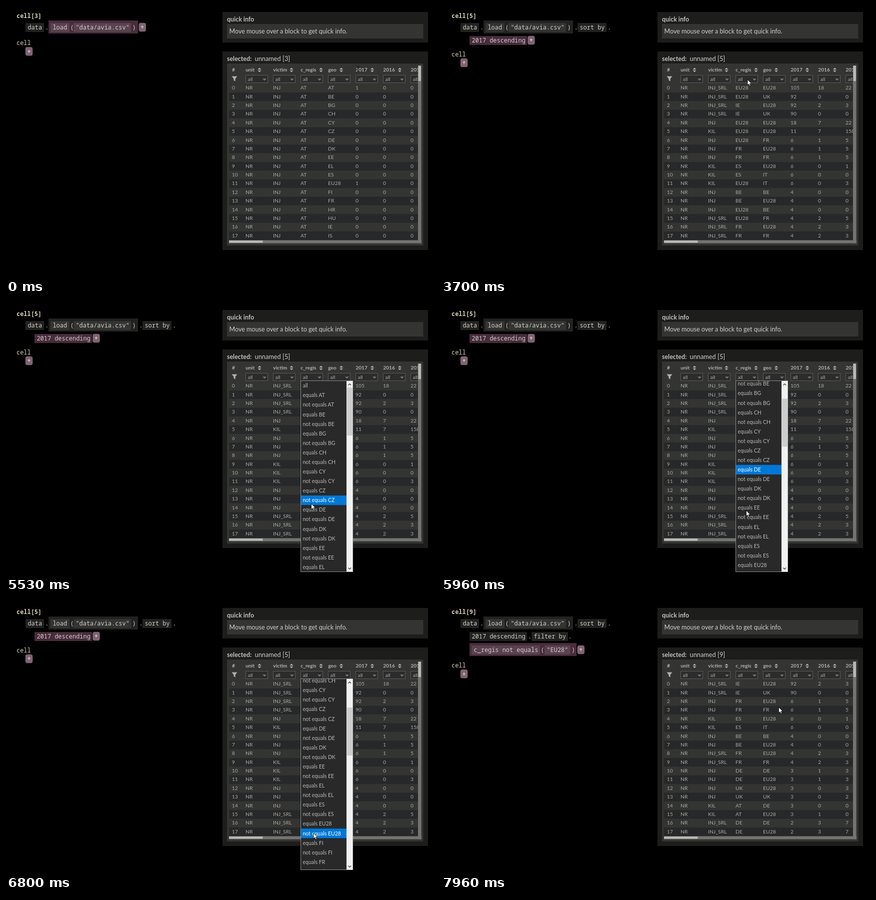
Animation of 858 by 540 pixels, one loop 8000 ms. Source, as an HTML page:

```html
<!DOCTYPE html>
<html lang="en">
<head>
<meta charset="utf-8">
<title>Data table notebook</title>
<style>
  html, body { margin: 0; width: 100%; height: 100%; overflow: hidden; background: #000001; }
  svg { display: block; width: 858px; height: 540px; }
  text { font-family: Lato, "Open Sans", sans-serif; font-size: 10.4px; fill: #a9a9a4; white-space: pre; }
  .head { font-size: 10.2px; font-weight: 700; fill: #b2b2ad; }
  .big { font-size: 12.8px; fill: #d0d0cb; }
  .info { font-size: 12.55px; }
  .title { font-size: 12.4px; font-weight: 700; fill: #c3c3be; }
  .mono { font-family: "Noto Sans Mono", "DejaVu Sans Mono", monospace; font-size: 11.95px; fill: #d2d0c8; }
  .cell { fill: #d6d0b8; }
  .bold { font-weight: 700; }
  .opt { font-size: 10.5px; fill: #b9b9b6; }
  .opt.on { fill: #fff; }
</style>
</head>
<body>
<svg viewBox="0 0 858 540" xmlns="http://www.w3.org/2000/svg">
  <defs>
    <clipPath id="tableClip"><rect x="446" y="116" width="378" height="353"/></clipPath>
    <clipPath id="listClip"><rect x="590" y="154" width="91" height="381"/></clipPath>
    <g id="arrow">
      <path d="M0 0V11.3L2.6 8.9 4.4 13 6.3 12.2 4.5 8.2H8.1Z" fill="#fff" stroke="#000" stroke-width=".8"/>
    </g>
    <g id="hand">
      <path d="M-1.2 8.2V.5Q-1.2-.7 0-.7T1.2.5V4.6L4.9 5.2Q6.6 5.6 6.5 7.2L6 10.2 5.2 12.8H-.2L-1.4 10.6-3.4 7.6Q-3.4 6-1.2 8.2Z"
        fill="#fff" stroke="#000" stroke-width=".8"/>
    </g>
    <g id="beam">
      <path d="M-2.5-5.2H-.8L0-4.6 .8-5.2H2.5M0-4.6V4.6M-2.5 5.2H-.8L0 4.6 .8 5.2H2.5" fill="none" stroke="#050505" stroke-width=".8"/>
    </g>
  </defs>
  <g id="first"></g>
  <g id="sorted"></g>
  <g id="menu"></g>
  <use id="cursor" href="#beam"/>
  <g id="filtered"></g>
</svg>
<script>
const LOOP = 8000;
const ROW = 17.38, OPTION = 19.08, LIST_TOP = 154, SCROLL = 158.7;
const DARK = '#222321', MID = '#343533', STRIPE = '#272829';
const PICK = '#482c3b', PICK_IN = '#5a4250', PLUS = '#7f6373';

const $ = id => document.getElementById(id);
const rect = (x, y, w, h, fill, more = '') =>
  `<rect x="${x}" y="${y}" width="${w}" height="${h}" fill="${fill}" ${more}/>`;
const text = (x, y, s, cls = '') => `<text x="${x}" y="${y}" class="${cls}">${s}</text>`;
const path = (d, fill) => `<path d="${d}" fill="${fill}"/>`;
const mono = (x, y, s, cls = '') => text(x, y, s, 'mono ' + cls);

// Data

const places = 'AT BE BG CH CY CZ DE DK EE EL ES EU28 FI FR HR HU IE IS'.split(' ');
const columns = [['unit', 507], ['victim', 571], ['c_regis', 630], ['geo', 670.5],
  ['2017', 732.5], ['2016', 787.5], ['2015', 842]];

const plainRows = places.map(p => {
  const hit = p === 'AT' || p === 'EU28' ? 1 : 0;
  return ['INJ', 'AT', p, hit, 0, 0];
});

const ranked = `INJ_SRL EU28 EU28 105 18 22
INJ_SRL EU28 UK 92 0 0
INJ_SRL IE EU28 92 2 3
INJ_SRL IE UK 90 0 0
INJ EU28 EU28 18 7 22
KIL EU28 EU28 11 7 158
INJ EU28 FR 6 1 5
INJ FR EU28 6 1 5
INJ FR FR 6 1 5
KIL ES EU28 6 0 1
KIL ES IT 6 0 0
KIL EU28 IT 6 0 3
INJ BE BE 4 0 0
INJ BE EU28 4 0 0
INJ EU28 BE 4 0 0
INJ_SRL EU28 FR 4 2 5
INJ_SRL FR EU28 4 2 3
INJ_SRL FR FR 4 2 3
INJ DE DE 3 1 3
INJ DE EU28 3 1 3
INJ UK EU28 3 0 3
INJ UK UK 3 0 2
KIL AT DE 3 0 0
KIL AT EU28 3 1 0
INJ_SRL DE DE 2 3 7
INJ_SRL DE EU28 2 3 7`.split('\n').map(line => line.split(' '));
const filteredRows = ranked.filter(r => r[1] !== 'EU28');

// Right side: info panel and table

function table(rows) {
  let s = '';
  for (let i = 0; i < 18; i++) {
    const y = 155.4 + i * ROW, base = (y + 11.9).toFixed(2);
    if (i % 2) s += rect(446, y.toFixed(2), 378, ROW, STRIPE);
    s += text(451.7, base, i);
    ['NR', ...rows[i]].forEach((v, c) => { s += text(479 + 55 * c, base, v); });
  }
  s += text(452, 131.2, '#', 'head');
  s += path('M451.5 140.5H462.5L458.6 145.5V150.5L455.4 148.5V145.5Z', '#b2b2ad');
  columns.forEach(([name, mark], c) => {
    const x = 479 + 55 * c;
    s += text(x + .3, 131.2, name, 'head');
    s += path(`M${mark - 3.6} 127h7.2l-3.6-3.6zm0 1.7h7.2l-3.6 3.6z`, '#b2b2ad');
    s += rect(x + .5, 138.5, 44, 15, '#2b2c2b', 'stroke="#5a5b59"');
    s += text(x + 4.5, 149.8, 'all');
    s += path(`M${x + 34} 145.3h8l-4 4z`, '#777874');
  });
  return `<g clip-path="url(#tableClip)">${s}</g>`;
}

function panels(number, rows) {
  return rect(433, 12, 411, 61, '#1d1e1c') + rect(442, 36, 392.5, 29, MID) +
    text(442, 31, 'quick info', 'title') +
    text(446.5, 55, 'Move mouse over a block to get quick info.', 'big info') +
    rect(433, 91, 411, 397, '#1d1e1c') + rect(442, 115, 392.5, 364, MID) +
    text(442, 110, 'selected:', 'title') +
    text(497.5, 110, `unnamed [${number}]`, 'big') +
    table(rows) +
    rect(446, 468.5, 385, 6, '#747472') + rect(446, 469, 67.5, 4.5, '#b9b9b7') +
    rect(824, 119, 6.5, 355.5, '#747472') + rect(824.5, 119.5, 5.5, 30.5, '#b9b9b7');
}

// Left side: code blocks

const block = (x, y, w, s, fill = DARK, pad = 4.4) => rect(x, y, w, 18, fill) + mono(x + pad, y + 12.8, s);
const plus = (x, y) => rect(x, y, 14.5, 17.5, PLUS, 'rx="4"') + mono(x + 3.6, y + 12.5, '+', 'bold');
const dot = (x, y) => mono(x, y, '.');
const nextCell = y => mono(21, y, 'cell', 'cell') + plus(38.8, y + 4);

function call(x, y, w, name, nameW, arg, argX, argW, picked) {
  const inner = picked ? PICK_IN : MID;
  return rect(x, y, w, 26, picked ? PICK : DARK) +
    block(x + 4, y + 5, nameW, name, inner) + mono(x + 4 + nameW + 1.6, y + 17.8, '(') +
    block(argX, y + 5, argW, arg, inner) + mono(argX + argW + 2.5, y + 17.8, ')');
}

const load = picked => block(39, 34, 37, 'data') + dot(78.3, 46.8) +
  call(85, 29, 179, 'load', 38, '"data/avia.csv"', 135, 115, picked);
const sortBy = load(false) + dot(266.5, 46.8) + block(273, 34, 58, 'sort by') + dot(333, 46.8);

const code = {
  3: load(true) + plus(265.5, 33.8) + nextCell(78),
  5: sortBy + block(57, 60, 115, '2017 descending', PICK) + plus(173.2, 59.8) + nextCell(100.8),
  9: sortBy + block(57, 60, 115, '2017 descending') + dot(174, 72.8) +
    block(181, 60, 73, 'filter by') + dot(254.5, 72.8) +
    call(57, 82, 214, 'c_regis not equals', 137, '"EU28"', 207, 51.5, true) +
    plus(272.5, 86.8) + nextCell(131)
};

const scene = (number, rows) => rect(0, 0, 858, 540, '#000001') +
  mono(21, 24, `cell[${number}]`, 'cell bold') + code[number] + panels(number, rows);

$('first').innerHTML = scene(3, plainRows);
$('sorted').innerHTML = scene(5, ranked);
$('filtered').innerHTML = scene(9, filteredRows) + '<use href="#arrow" x="675.5" y="210.5"/>';

// Drop-down list

const options = ['all', ...places.flatMap(p => ['equals ' + p, 'not equals ' + p])];
$('menu').innerHTML = rect(589.5, 153.5, 104, 382, '#29292a', 'stroke="#8b8c8c"') +
  '<g clip-path="url(#listClip)"><g id="list">' +
  rect(589, 0, 92, OPTION, '#0078d7', 'id="glow"') +
  options.map((o, i) => text(593.5, (i * OPTION + 13.3).toFixed(2), o, 'opt')).join('') +
  '</g></g>' +
  rect(681, 154, 12.5, 381.5, '#f1f1f1') + rect(682, 167, 11, 96, '#cdcdcd', 'id="thumb"') +
  '<path d="M684.5 162.5l2.8-2.8 2.8 2.8M684.5 527.5l2.8 2.8 2.8-2.8" fill="none" stroke="#404040" stroke-width="1.3"/>';
const labels = document.querySelectorAll('.opt');

// Motion

const clamp = v => Math.min(1, Math.max(0, v));
const span = (t, a, b) => clamp((t - a) / (b - a));
const ease = p => (p + p * p * (3 - 2 * p)) / 2;

const track = [
  [30, 704, 126], [460, 731, 125.5], [1230, 731, 125.5], [1330, 729, 125.5], [1400, 732, 126.5],
  [3170, 732, 126.5], [3700, 613, 147], [4770, 613, 147], [5600, 610.5, 413],
  [6430, 610.5, 413], [6800, 615, 462]
];

function pointer(t) {
  let [, x, y] = track[0];
  for (let i = 1; i < track.length && t > track[i - 1][0]; i++) {
    const [a, ax, ay] = track[i - 1], [b, bx, by] = track[i];
    const p = ease(span(t, a, b));
    x = ax + (bx - ax) * p;
    y = ay + (by - ay) * p;
  }
  return [x, y];
}

function shape(x, y) {
  if (y < 134 && x > 727) return '#hand';
  if (y < 134 && x > 698 && x < 724) return '#beam';
  return '#arrow';
}

function draw(t) {
  $('sorted').setAttribute('opacity', span(t, 2097, 2500));
  $('filtered').setAttribute('opacity', span(t, 7597, 7960));

  const [x, y] = pointer(t);
  $('cursor').setAttribute('href', shape(x, y));
  $('cursor').setAttribute('transform', `translate(${x.toFixed(2)} ${y.toFixed(2)})`);

  const open = t >= 4230 && t < 7160;
  $('menu').setAttribute('visibility', open ? 'visible' : 'hidden');
  if (!open) return;

  const scroll = SCROLL * ease(span(t, 5687, 6230));
  // The highlight only follows the mouse while it moves, not the wheel.
  const offset = t < 6430 ? 0 : scroll;
  const index = Math.max(0, Math.floor((y - LIST_TOP + offset) / OPTION));
  $('list').setAttribute('transform', `translate(0 ${(LIST_TOP - scroll).toFixed(2)})`);
  $('glow').setAttribute('y', index * OPTION);
  $('thumb').setAttribute('y', 167 + scroll * .277);
  labels.forEach((label, i) => label.classList.toggle('on', i === index));
}

const start = performance.now();
function tick() {
  draw((performance.now() - start) % LOOP);
  requestAnimationFrame(tick);
}
tick();
</script>
</body>
</html>
```
